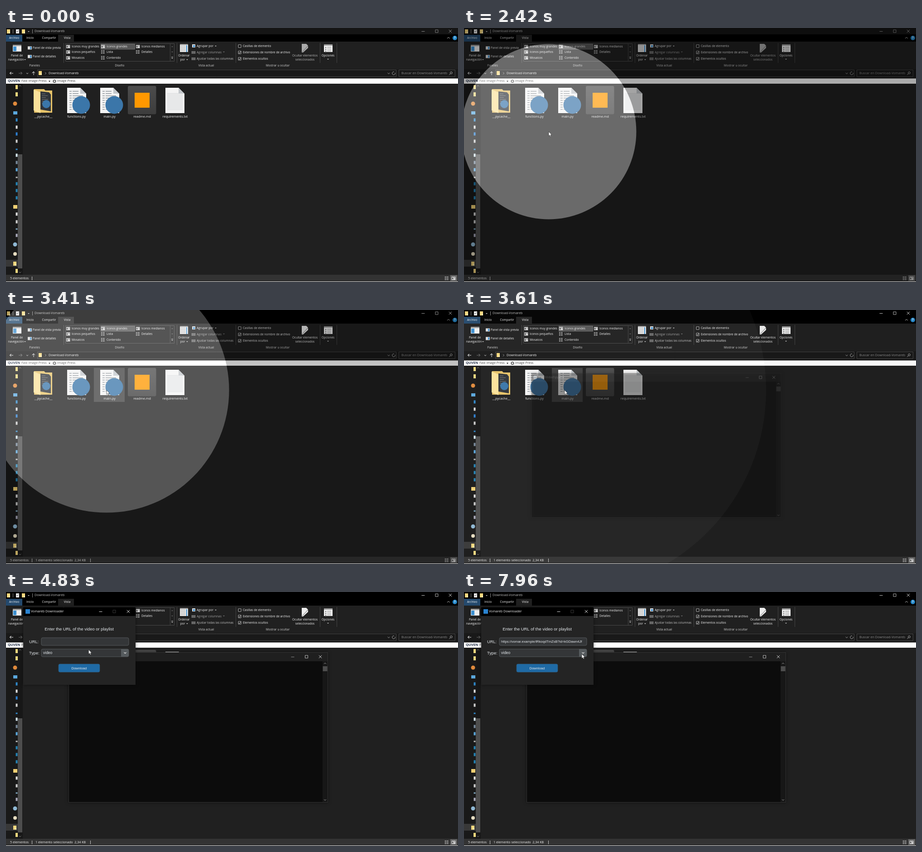
These frames come from a looping animation (998x561 px, 8000 ms). An HTML page with a canvas:

```html
<!DOCTYPE html>
<html lang="es">
<head>
<meta charset="utf-8">
<style>
  html, body { margin: 0; width: 100%; height: 100%; overflow: hidden; background: #202020; }
  canvas { display: block; }
</style>
</head>
<body>
<canvas id="stage" width="998" height="561"></canvas>
<script>
const screen2d = document.getElementById('stage').getContext('2d');
const layer = document.createElement('canvas');
layer.width = 998;
layer.height = 561;
const layer2d = layer.getContext('2d');
let ctx = screen2d;

const LOOP = 8000, WHITE = '#f2f2f2', GREY = '#a0a0a0', PANEL = '#202020';
const UI = '"Open Sans", "Noto Sans", sans-serif', FORM = '"Liberation Sans", Arial, sans-serif';
const FOLDER = 'Download-Vomareb';
const LINK = 'https://vomar.example/lRkoqdTmZsB?id=kGDawn4Jf';

// The screen only refreshes at these moments: [first, last, count]
const ticks = [[0, 0, 1], [730, 1490, 11], [1620, 1960, 5], [2290, 2290, 1], [2420, 2490, 2],
  [2620, 2750, 2], [2950, 3210, 3], [3410, 3610, 2], [3740, 4140, 3], [4340, 5100, 11],
  [5170, 5310, 3], [6040, 6310, 2], [6970, 7360, 4], [7760, 7960, 2]]
  .flatMap(([a, b, n]) => Array.from({ length: n }, (_, i) => a + (n > 1 ? (b - a) * i / (n - 1) : 0)));

// Pointer path: [time, x, y]
const path = [[730, 916, 52], [1030, 560, 342], [1490, 90, 220], [1620, 66, 150], [1790, 262, 272],
  [1960, 187, 229], [2750, 187, 229], [3210, 222, 177], [4340, 222, 177], [4720, 190, 120],
  [5100, 152, 158], [5310, 150, 111], [6970, 150, 111], [7360, 255, 123], [7760, 260, 137]];

const clamp = v => Math.max(0, Math.min(1, v));
const easeOut = p => 1 - (1 - clamp(p)) ** 3;

function pointerAt(t) {
  const i = path.findIndex(k => k[0] > t);
  if (i < 0) return path[path.length - 1].slice(1);
  const [t0, x0, y0] = path[Math.max(0, i - 1)], [t1, x1, y1] = path[i];
  const p = clamp((t - t0) / (t1 - t0));
  return [x0 + (x1 - x0) * p, y0 + (y1 - y0) * p];
}

function rect(x, y, w, h, fill, stroke, radius = 0) {
  ctx.beginPath();
  ctx.roundRect(x, y, w, h, radius);
  if (fill) { ctx.fillStyle = fill; ctx.fill(); }
  if (stroke) { ctx.strokeStyle = stroke; ctx.lineWidth = 0.8; ctx.stroke(); }
}
function poly(points, fill, stroke, width = 0.9) {
  ctx.beginPath();
  for (let i = 0; i < points.length; i += 2) ctx.lineTo(points[i], points[i + 1]);
  if (fill) { ctx.closePath(); ctx.fillStyle = fill; ctx.fill(); }
  if (stroke) { ctx.strokeStyle = stroke; ctx.lineWidth = width; ctx.stroke(); }
}
function disc(x, y, r, fill) {
  ctx.beginPath();
  ctx.arc(x, y, r, 0, 7);
  ctx.fillStyle = fill;
  ctx.fill();
}
function text(s, x, y, color = WHITE, align = 'left', size = 7.15, font = UI, weight = 400) {
  ctx.font = `${weight} ${size}px ${font}`;
  ctx.textAlign = align;
  ctx.textBaseline = 'middle';
  ctx.fillStyle = color;
  ctx.fillText(s, x, y);
}
const small = (s, x, y, color, align) => text(s, x, y, color, align, 6.5);
const label = (s, x, y, color) => small(s, x, y, color, 'center');
const line = (color, ...points) => poly(points, null, color);
const vline = (x, y0, y1, color = '#4a4a4a') => line(color, x + 0.5, y0, x + 0.5, y1);
const chevron = (x, y, up = 1, color = '#ccc', w = 2.5) => line(color, x - w, y - up, x, y + up * 1.4, x + w, y - up);
const triangle = (x, y, color = '#ccc', h = 2) => poly([x - 2, y - h / 2, x + 2, y - h / 2, x, y + h / 2], color);
const folder = (x, y) => { rect(x, y, 7, 9, '#f6d77c'); rect(x + 4.5, y + 4.5, 2.5, 4.5, '#fff0b5'); };

function windowButtons(y, xs, colors) {
  line(colors[0], xs[0] - 3.5, y + .5, xs[0] + 3.5, y + .5);
  rect(xs[1] - 3, y - 3, 6, 6, null, colors[1]);
  line(colors[2], xs[2] - 3.2, y - 3.2, xs[2] + 3.2, y + 3.2);
  line(colors[2], xs[2] - 3.2, y + 3.2, xs[2] + 3.2, y - 3.2);
}

function gridIcon(x, y) {
  rect(x - 4, y - 3.5, 8.5, 7, '#d8d8d8');
  rect(x - 3, y - 2, 2.5, 4, '#555');
  rect(x + 1, y - 2, 2.5, 1.5, '#777');
}
function listIcon(x, y) {
  for (const dy of [-3, 0, 3]) {
    rect(x - 4, y + dy - 1, 2, 1.6, '#ddd');
    rect(x - 1, y + dy - 1, 5, 1.4, '#aaa');
  }
}

function titleAndTabs(active) {
  rect(0, 0, 998, 30, '#000');
  if (!active) rect(0, 0, 998, 14, '#151515');
  folder(2, 3);
  vline(15, 3, 12, '#999');
  rect(22, 3, 7, 9, '#eee');
  line('#555', 23.5, 7, 25, 9, 27.5, 5);
  folder(35, 3);
  triangle(50, 8);
  vline(58, 3, 12, '#999');
  text(FOLDER, 63, 7.5, '#bdbdbd');
  const tone = active ? '#ddd' : '#999';
  windowButtons(7, [921, 951, 981], [tone, tone, tone]);
  rect(0, 15, 36, 15, '#24496d');
  rect(115, 15, 35, 15, PANEL);
  [['Archivo', 18], ['Inicio', 53], ['Compartir', 95], ['Vista', 135]].forEach(([s, x]) => label(s, x, 22));
  chevron(977, 22, -1, '#ccc', 3);
  disc(991, 22, 5, '#2387c9');
  text('?', 991, 22, '#fff', 'center', 7, UI, 700);
}

function ribbon(selected) {
  rect(0, 30, 998, 61, PANEL);
  rect(15, 37, 19, 15, '#eee');
  rect(15, 37, 19, 3, '#999');
  rect(16, 41, 7, 10, '#3c8fd0');
  label('Panel de', 24, 61);
  label('navegación', 22, 70);
  triangle(42, 70);
  for (const y of [44, 63]) {
    rect(48, y - 3.5, 9, 7, '#ddd');
    rect(53, y - 2.5, 3, 5, '#3c8fd0');
  }
  small('Panel de vista previa', 59, 44);
  small('Panel de detalles', 59, 63);

  rect(131.5, 34.5, 240, 39, '#202020', '#555');
  rect(209.5, 35.5, 75, 11.5, '#555', '#777');
  vline(362, 35, 73);
  [['Iconos muy grandes', 145, 41], ['Iconos pequeños', 145, 53], ['Mosaicos', 145, 66],
   ['Iconos grandes', 222, 41], ['Lista', 222, 53], ['Contenido', 222, 66],
   ['Iconos medianos', 299, 41], ['Detalles', 299, 53]].forEach(([s, x, y]) => {
    (y === 41 || x === 145 ? gridIcon : listIcon)(x - 8, y);
    small(s, x, y);
  });
  triangle(367, 41, '#666', -2);
  triangle(367, 53, '#666');
  line('#ccc', 365, 64, 369, 64);
  triangle(367, 67);

  rect(384, 35, 18, 18, '#eee');
  for (let i = 0; i < 4; i++) rect(385, 39 + i * 3.5, 12, 1, '#999');
  rect(384, 35, 18, 2, '#777');
  rect(398, 38, 2, 15, '#3c8fd0');
  label('Ordenar', 393, 61);
  label('por', 390, 70);
  triangle(400, 70);
  rect(411, 36, 7, 7, '#ddd');
  rect(413, 38, 4, 4, '#3c8fd0');
  for (const y of [54, 68]) for (let i = 0; i < 3; i++) rect(410 + i * 3, y - 3, 2, 6, '#888');
  small('Agrupar por', 421, 40);
  triangle(463, 40);
  small('Agregar columnas', 421, 54, GREY);
  triangle(481, 53, '#777');
  small('Ajustar todas las columnas', 421, 68, '#c4c4c4');

  ['Casillas de elemento', 'Extensiones de nombre de archivo', 'Elementos ocultos'].forEach((s, i) => {
    const y = 40 + i * 14;
    rect(513, y - 3, 6, 6, '#111', '#ddd');
    if (i) line('#fff', 514, y, 515.5, y + 1.8, 518.3, y - 2);
    small(s, 523, y);
  });
  const tone = selected ? WHITE : '#b8b8b8';
  poly([653, 35, 663, 35, 667, 39, 667, 44, 656, 54, 653, 54], selected ? '#eee' : '#aaa');
  line('#555', 654, 53, 667, 39);
  label('Ocultar elementos', 660, 61, tone);
  label('seleccionados', 660, 70, tone);
  rect(702, 36, 19, 17, '#eee');
  rect(702, 36, 19, 3, '#999');
  for (const y of [42, 46, 50]) { rect(705, y, 2, 2, '#666'); rect(709, y, 9, 1, '#888'); }
  label('Opciones', 711, 61);
  triangle(711, 69);
  [['Paneles', 63], ['Diseño', 251], ['Vista actual', 442], ['Mostrar u ocultar', 600]]
    .forEach(([s, x]) => label(s, x, 83, '#cfcfcf'));
  for (const x of [127, 377, 507, 693, 730]) vline(x, 33, 77);
}

function addressBar() {
  rect(0, 91, 998, 20, '#191919');
  line('#fff', 16, 100, 8.5, 100, 11.5, 97, 8.5, 100, 11.5, 103);
  line('#777', 28, 100, 35.5, 100, 32.5, 97, 35.5, 100, 32.5, 103);
  chevron(47, 100, 1, '#ccc', 2);
  line('#fff', 61, 104, 61, 96.5, 58, 99.5, 61, 96.5, 64, 99.5);
  rect(69.5, 92.5, 792, 15, '#191919', '#535353');
  rect(867.5, 92.5, 124, 15, '#191919', '#535353');
  folder(72, 95);
  line('#aaa', 86, 97.5, 88.5, 100, 86, 102.5);
  text(FOLDER, 94, 100);
  chevron(845, 100, 1, '#aaa');
  ctx.beginPath();
  ctx.arc(856, 100, 3.2, -.3, 5);
  ctx.strokeStyle = '#bbb';
  ctx.stroke();
  text('Buscar en ' + FOLDER, 873, 100, '#8a8a8a');
  ctx.beginPath();
  ctx.arc(983, 99, 2.3, 0, 7);
  ctx.stroke();
  line('#bbb', 981.2, 100.8, 978.5, 103.5);

  rect(0, 111.5, 998, 11.5, '#fff');
  text('QUVEN', 4, 117.5, '#26324a', 'left', 7.6, UI, 700);
  text('Fast Image Press', 34, 117.5, '#444');
  triangle(96, 118, '#222', 3);
  disc(107, 117.5, 3.6, '#555');
  disc(107, 117.5, 1.8, '#fff');
  text('Image Press', 113, 117.5, '#444');
}

function navigation() {
  rect(0, 123, 37, 422, '#191919');
  rect(0, 512, 26, 15, '#383838');
  for (const y of [126, 142, 516, 532]) folder(y === 516 ? 16 : 21, y);
  disc(20, 167, 4.5, '#e08a3c');
  disc(20, 478, 4.5, '#8fb8d4');
  disc(20, 499, 4, '#e6dcc0');
  rect(16, 184, 9, 7, '#5aa7dc');
  rect(16, 391, 9, 8, '#f0cf74');
  [[203, '#2f87c8'], [219, '#ddd'], [234, '#2d7ed0'], [250, '#ccc'], [268, '#2f87c8'], [281, '#d5e6f2'],
   [297, '#789'], [313, '#5aa7dc'], [330, '#bbb'], [344, '#2583b5'], [359, '#2583b5'], [375, '#2583b5'],
   [411, '#ddd'], [428, '#ccc'], [444, '#7fa6bd'], [458, '#aab']].forEach(([y, c]) => {
    const flat = [268, 330, 444].includes(y);
    rect(21.5, y - (flat ? 1.5 : 3.5), 4, flat ? 3 : 7, c);
  });
  rect(26, 123, 11, 422, '#171717');
  rect(26, 279, 10, 252, '#4d4d4d');
  chevron(31, 128, -1, '#888');
  chevron(31, 539.5, 1, '#888');
}

function page(x) {
  poly([x, 132, x + 29, 132, x + 42, 145, x + 42, 188, x, 188], '#f4f4f4');
  poly([x + 29, 132, x + 42, 145, x + 29, 145], '#c4c8cc');
}

function files(t, [px, py]) {
  const centers = [82, 155, 228, 300, 373];
  const hovered = t >= 3300 ? 2 : t < 730 ? -1 : centers.findIndex(x => Math.abs(px - x) < 34 && py > 128 && py < 203);
  if (hovered >= 0) rect(centers[hovered] - 34, 128, 68, 75, t >= 3410 ? '#404040' : '#383838');

  poly([62, 135, 84, 135, 87, 138, 102, 138, 102, 187, 62, 187], '#e6c268');
  poly([76, 140, 95, 142, 99, 147, 99, 184, 76, 180], '#30343a');
  for (let i = 0; i < 6; i++) rect(79, 145 + i * 4, 8 + i * 5 % 9, 1, '#777');
  disc(89, 168, 9, '#3b76a9');
  poly([61, 136, 76, 142, 76, 188, 61, 182], '#fbe19a');

  for (const x of [135, 208]) {
    page(x);
    for (let i = 0; i < 9; i++) {
      rect(x + 5, 139 + i * 5, 5, 1.4, '#8a9096');
      rect(x + 12, 139 + i * 5, i < 2 ? 13 : 23, 1.4, '#8a9096');
    }
    disc(x + 31, 170, 19.5, '#3b76a9');
  }
  const tile = ctx.createLinearGradient(0, 128, 0, 190);
  tile.addColorStop(0, '#4c4c4c');
  tile.addColorStop(1, '#3d3d3d');
  rect(269, 128, 62.5, 62.5, tile, null, 3);
  rect(284, 143, 33, 33, '#ff9800');
  page(352);
  for (let i = 0; i < 13; i++) rect(356, 144 + i * 3, 34, .8, '#c0c4c8');
  ['__pycache__', 'functions.py', 'main.py', 'readme.md', 'requirements.txt']
    .forEach((s, i) => text(s, centers[i] + .5, 196, WHITE, 'center'));
}

function statusBar(selected) {
  rect(0, 545, 998, 15, '#333');
  rect(0, 560, 998, 1, '#e6e6e6');
  text('5 elementos', 9, 553);
  vline(57, 549, 557, '#ddd');
  if (selected) {
    text('1 elemento seleccionado  2,34 KB', 65, 553);
    vline(186, 549, 557, '#ddd');
  }
  listIcon(973, 553);
  rect(981, 546, 15, 13, '#666');
  gridIcon(988, 553);
}

// Windows grow slightly and fade in as one layer while opening
function opening(start, t, x, y, w, h, draw) {
  const p = clamp((t - start) / 150);
  if (!p) return;
  ctx = layer2d;
  ctx.clearRect(0, 0, 998, 561);
  draw();
  ctx = screen2d;
  const scale = 1 - 0.055 * (1 - p), cx = x + w / 2, cy = y + h / 2;
  ctx.save();
  ctx.globalAlpha = p;
  ctx.shadowColor = 'rgba(0,0,0,.5)';
  ctx.shadowBlur = 7;
  ctx.translate(cx, cy);
  ctx.scale(scale, scale);
  ctx.drawImage(layer, -cx, -cy);
  ctx.restore();
}

function consoleWindow() {
  rect(138, 133, 573, 331.5, '#0c0c0c');
  rect(138, 133, 573, 20, '#1f1f1f');
  disc(147, 143, 4.5, '#b8c2cc');
  text('C:\\Utilidad\\py.exe', 155, 143, '#aaa');
  windowButtons(143, [633, 663.5, 694], ['#999', '#ddd', '#ddd']);
  rect(699, 153, 11, 311, '#171717');
  rect(699.5, 164, 10, 11, '#4d4d4d');
  chevron(704.5, 158, -1, '#aaa');
  chevron(704.5, 459, 1, '#aaa');
  rect(138.5, 133.5, 572, 331, null, '#3c3c3c');
}

function formWindow(t) {
  const form = (s, x, y, size, align) => text(s, x, y, '#e4e8ec', align, size, FORM);
  rect(38, 34, 248, 171, '#242424');
  rect(38, 34, 248, 19, '#000');
  rect(43, 38, 10, 10, '#2a83d0');
  text('Vomareb Downloader', 55, 43.5);
  windowButtons(43, [209, 239, 270], [WHITE, '#444', WHITE]);
  form('Enter the URL of the video or playlist', 161.5, 82.5, 9.4, 'center');
  form('URL:', 51, 110.5, 9.3);
  form('Type:', 51, 135, 9.3);
  rect(78, 101, 193, 17, '#343638', '#5d6265', 3);
  rect(78, 126, 193, 17, '#343638', '#5d6265', 3);
  rect(254, 126, 17, 17, '#565b5e', null, [0, 3, 3, 0]);
  poly([260.5, 133.5, 263, 135.5, 265.5, 133.5], null, '#e8e8e8', 1.3);
  form('video', 82, 134.5, 8.5);
  rect(116, 159, 91, 18, '#1f6aa5', '#30566f', 3);
  form('Download', 161.3, 168.5, 7.6, 'center');
  if (t >= 6310) form(LINK, 82, 110, 7.6);
  if (t >= 5310 && t < 6040) vline(82, 104, 115, '#ddd');
  if (t >= 6310 && t < 6970 || t >= 7360 && t < 7960) vline(262, 104, 115, '#ddd');
}

function spotlight(t, [x, y]) {
  const p = easeOut((t - 2269) / 500) - easeOut((t - 3300) / 500);
  if (p <= 0) return;
  const r = 468 - 416 * p;
  ctx.beginPath();
  ctx.rect(0, 0, 998, 560);
  ctx.arc(x, y, r, 0, 7);
  ctx.fillStyle = `rgba(0,0,0,${p / 2})`;
  ctx.fill('evenodd');
  disc(x, y, r, `rgba(255,255,255,${p / 2})`);
}

function pointer(t, [x, y]) {
  if (t < 730) return;
  if (t >= 5310 && t < 7360) return vline(x - .5, y - 1, y + 8, '#111');
  poly([x, y, x, y + 9.5, x + 2.2, y + 7.5, x + 3.8, y + 11, x + 5.4, y + 10.2, x + 3.9, y + 7, x + 6.8, y + 6.8, x, y],
    '#fff', '#222', .6);
}

function frame(now) {
  const real = now % LOOP;
  const t = ticks.filter(v => v <= real).pop();
  const pos = pointerAt(t), selected = t >= 3410;
  rect(0, 0, 998, 561, PANEL);
  titleAndTabs(selected);
  ribbon(selected);
  addressBar();
  navigation();
  files(t, pos);
  statusBar(selected);
  opening(3560, t, 138, 133, 573, 331.5, consoleWindow);
  opening(4042, t, 38, 34, 248, 171, () => formWindow(t));
  spotlight(t, pos);
  pointer(t, pos);
  requestAnimationFrame(frame);
}
requestAnimationFrame(frame);
</script>
</body>
</html>
```
